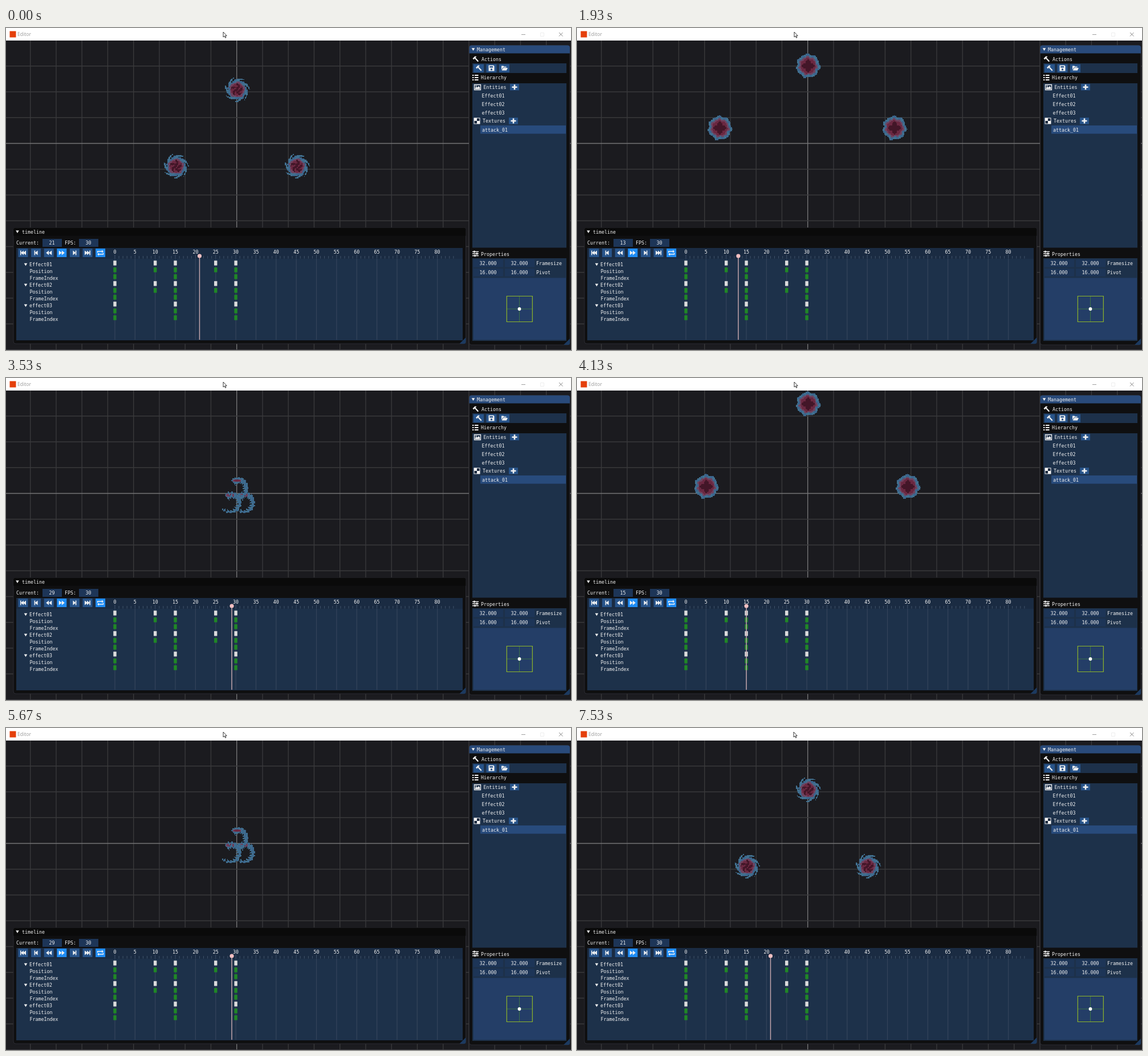
Write an HTML page with a canvas that moves like this. It is 991 by 565 pixels and loops after 7.59 s.

```html
<!DOCTYPE html>
<html lang="en">
<head>
<meta charset="utf-8">
<title>Editor</title>
<style>
  html, body { margin: 0; width: 991px; height: 565px; overflow: hidden; background: #1b1b1f; }
  svg, canvas { position: absolute; left: 0; top: 0; display: block; }
  text { font: 8.3px "DejaVu Sans Mono", monospace; fill: #f2f2f2; white-space: pre; }
  .mid { text-anchor: middle; }
  .caption { font: 8.6px "Open Sans", sans-serif; fill: #999; }
</style>
</head>
<body>
<svg id="ui" width="991" height="565" viewBox="0 0 991 565"></svg>
<canvas id="view" width="812" height="350"></canvas>
<script>
const LOOP = 7590, STEP = 200 / 3;
const CELL = 45.25, ORIGIN = { x: 404.7, y: 202.5 };
const RULER = 191, UNIT = 7.07;
const NAVY = '#1d314a', FIELD = '#1d3557', BUTTON = '#28548a', ACTIVE = '#1f8cf4', WHITE = '#f2f2f2';

// ---- static interface -------------------------------------------------
const out = [];
const add = s => out.push(s);
const rect = (x, y, w, h, fill, more = '') =>
  add(`<rect x="${x}" y="${y}" width="${w}" height="${h}" fill="${fill}" ${more}/>`);
const path = (d, fill, more = '') => add(`<path d="${d}" fill="${fill}" ${more}/>`);
const stroke = (d, color, width = 1) => path(d, 'none', `stroke="${color}" stroke-width="${width}"`);
const text = (x, mid, s, cls = '', id = '') =>
  add(`<text x="${x}" y="${mid + 3}" class="${cls}" id="${id}">${s}</text>`);
const icon = (x, y, d, fill = WHITE, more = '') => path(d, fill, `transform="translate(${x} ${y})" ${more}`);
const lineIcon = (x, y, d, width = 1.3) =>
  icon(x, y, d, 'none', `stroke="${WHITE}" stroke-width="${width}"`);
const arrow = (x, y) => icon(x, y, 'M-2.8-2.2H2.8L0 2.6Z');
const field = (x, y, w, h, value, id) => {
  rect(x, y, w, h, FIELD);
  text(x + w / 2 - 0.5, y + h / 2, value, 'mid', id);
};

function grid() {
  for (let i = -8; i <= 12; i++) {
    const x = ORIGIN.x + i * CELL;
    stroke(`M${x} 22V565`, i ? '#39393b' : '#747476', 1.4);
  }
  for (let i = -3; i <= 7; i++) {
    const y = ORIGIN.y + i * CELL;
    stroke(`M0 ${y}H991`, i ? '#39393b' : '#747476', 1.4);
  }
  stroke('M0 564.5H991', '#3a3a40');
}

function titleBar() {
  rect(0, 0, 991, 22, '#fff');
  rect(6.5, 5.5, 11, 11, '#e5400c');
  text(20, 11.3, 'Editor', 'caption');
  stroke('M904 11.5h7', '#a0a0a0');
  stroke('M937.5 8.5h6v6h-6z', '#ededed');
  stroke('M970 8l6.5 6.5M976.5 8l-6.5 6.5', '#888');
}

function panel(x, y, w, h, head) {
  rect(x, y, w, h, '#0f0f10', 'rx="4" stroke="#2b2b32"');
  path(`M${x} ${y + 14}v-10q0-4 4-4h${w - 8}q4 0 4 4v10z`, head);
  path(`M${x + w} ${y + h - 11}v8q0 3-3 3h-8z`, '#1c3a60');
  arrow(x + 7, y + 7);
}

function timeline() {
  panel(13, 350.5, 793.5, 203.5, '#0a0a0a');
  text(28, 357.5, 'timeline');
  text(18, 377, 'Current:');
  field(64, 370, 34, 14, '21', 'current');
  text(103, 377, 'FPS:');
  field(128, 370, 34, 14, '30');
  rect(18, 386, 783, 162, NAVY);
  rect(18, 386, 783, 19, '#1a2b42');

  const left = 'M0-4V4L-5 0Z', right = 'M0-4V4L5 0Z';
  const shift = (d, x) => d.replace('M0', 'M' + x).replace(/L(-?\d)/, (_, n) => 'L' + (+n + x));
  const glyphs = [
    'M-5-4h1.6v8h-1.6z' + shift(left, 1) + shift(left, 5),
    'M-3-4h1.6v8h-1.6z' + shift(left, 3),
    shift(left, 0) + shift(left, 5),
    shift(right, -5) + shift(right, 0),
    shift(right, -3) + 'M1.4-4h1.6v8h-1.6z',
    shift(right, -5) + shift(right, -1) + 'M3.4-4h1.6v8h-1.6z'
  ];
  for (let i = 0; i < 7; i++) {
    const x = 30 + i * 22.6;
    rect(x - 8.5, 387, 17, 15, i === 3 || i === 6 ? ACTIVE : BUTTON);
    if (i < 6) icon(x, 394.5, glyphs[i]);
    else {
      lineIcon(x, 394.5, 'M-5 0V-2.5H3M5 0V2.5H-3');
      icon(x, 394.5, 'M2.5-5L5.5-2.5 2.5 0ZM-2.5 0L-5.5 2.5-2.5 5Z');
    }
  }

  for (let f = 0; f <= 84; f++) {
    const x = RULER + f * UNIT, major = f % 5 === 0;
    stroke(`M${x} ${major ? 398 : 400}V404.5`, '#41536a');
    if (!major) continue;
    stroke(`M${x} 405V547`, '#33435a', 1.3);
    text(x, 393, f, 'mid');
  }

  const long = [0, 10, 15, 25, 30], short = [0, 15, 30];
  const keys = (frames, y, fill) =>
    frames.forEach(f => rect(RULER + f * UNIT - 2.7, y - 4.2, 5.4, 8.4, fill));
  ['Effect01', 'Effect02', 'effect03'].forEach((name, i) => {
    const y = 415 + i * 36, frames = i < 2 ? long : short;
    arrow(34.5, y);
    text(41, y, name);
    text(41.5, y + 12, 'Position');
    text(41.5, y + 24, 'FrameIndex');
    keys(frames, y - 2.6, '#dcdcdc');
    keys(frames, y + 9.4, '#208726');
    keys(short, y + 21.4, '#208726');
  });
  add('<g id="head"><path d="M0 400V547" stroke="#c3a5ac" stroke-width="1.5"/><circle cy="400" r="3.6" fill="#f4c0c2"/></g>');
}

function plus(x, y) {
  rect(x - 8, y - 5.7, 16, 11.4, BUTTON);
  lineIcon(x, y, 'M-4.5 0H4.5M0-4.5V4.5', 2.6);
}

function hammer(x, y) {
  icon(x, y, 'M-5-1L-1-5 2-4.5 0-2.5 5.5 3.5 4 5-1.5-1-3 1Z');
}

function management() {
  panel(812.5, 30.5, 176.5, 525.5, '#294a7a');
  text(826, 37.5, 'Management');
  hammer(823.5, 54.5);
  text(834, 54.5, 'Actions');
  rect(818, 62, 165, 17, NAVY);
  [829, 851.5, 874].forEach(x => rect(x - 9, 63.5, 18, 14.5, BUTTON));
  hammer(829, 70.5);
  icon(851.5, 70.5, 'M-5-5H3.5L5-3.5V5H-5ZM-3.2-3.6V-1H2.6V-3.6ZM-1.7 2.3a1.7 1.7 0 1 0 3.4 0a1.7 1.7 0 1 0-3.4 0Z', WHITE, 'fill-rule="evenodd"');
  icon(874, 70.5, 'M-5 3V-4H-1.5L-.5-2.8H3.5V-1.2H-2.5ZM-4.5 4L-2-.4H6L3.8 4Z');

  lineIcon(823, 87, 'M-5-4H-2.6M-5 0H-2.6M-5 4H-2.6M-1-4H5.5M-1 0H5.5M-1 4H5.5', 2);
  text(833, 87, 'Hierarchy');
  rect(818, 97, 165, 288.5, NAVY);
  lineIcon(827, 104, 'M-5.5-4.5H5.5V4.5H-5.5Z');
  icon(827, 104, 'M-4.3 3.2V1L-2-1-.5.5 2-2 4.3.6V3.2ZM-3.5-2.2a1 1 0 1 0 2 0a1 1 0 1 0-2 0Z');
  text(837.5, 104, 'Entities');
  plus(892, 103.7);
  ['Effect01', 'Effect02', 'effect03'].forEach((s, i) => text(834.5, 119 + i * 14.8, s));
  rect(820.5, 157.5, 11, 11, WHITE);
  path('M826 158.5h4.5v4.5h-4.5zM821.5 163h4.5v4.5h-4.5z', '#16253a');
  text(836, 163, 'Textures');
  plus(890, 163);
  rect(832, 171, 150, 14.5, '#284b7c');
  text(835, 178.5, 'attack_01');

  lineIcon(823.5, 396, 'M-5.5-3.5H5.5M-5.5 0H5.5M-5.5 3.5H5.5');
  lineIcon(823.5, 396, 'M-2-5.2V-1.8M2.5-1.7V1.7M-1 1.8V5.2', 2);
  text(833, 396.5, 'Properties');
  rect(818, 404, 165, 145, NAVY);
  [['32.000', 'Framesize'], ['16.000', 'Pivot']].forEach(([value, label], i) => {
    const y = 406 + i * 16.3;
    field(820, y, 52, 13.6, value);
    field(875, y, 52, 13.6, value);
    text(930, y + 6.8, label);
  });
  rect(820, 438.5, 162, 108.5, '#243e67');
  stroke('M900.5 470.5V515.5M878 493H923', '#3c7148');
  stroke('M878.3 470.5h45v45h-45z', '#8fb629', 1.2);
  add('<circle cx="900.5" cy="493" r="2.9" fill="#fff"/>');
}

grid();
titleBar();
timeline();
management();
add('<path id="mouse" d="M0 0V9L2.1 7.1 3.6 10.3 5 9.7 3.6 6.6H6.2Z" fill="#fff" stroke="#222" stroke-width=".9"/>');
document.getElementById('ui').innerHTML = out.join('');

// ---- pixel sprites ----------------------------------------------------
const SIZE = 32, SCALE = CELL / SIZE, TAU = Math.PI * 2;
const BLUE = '#41708f', STEEL = '#3b658c', MAUVE = '#6d4460', WINE = '#6b2841', DARK = '#431628';
const frac = v => v - Math.floor(v);

function crescent(stage, x, y, r, a) {
  const u = (a + 2.25) / (4.7 + stage * 0.5);
  if (u < 0 || u > 1) return;
  const jag = 0.7 * Math.sin(a * 17 + r);
  const outer = 11.4 + 2.4 * Math.sin(Math.min(1, u * 2) * Math.PI / 2) + jag;
  const inner = outer - (7.2 + stage * 2) * (1 - u) - 1.6 + jag;
  if (r > outer || r < inner) return;
  const spot = Math.hypot(x / (5.5 + stage), (y + 8.5) / (1.8 + stage));
  if (spot < 1) return spot < 0.65 ? WINE : MAUVE;
  return Math.sin(a * 9 + r * 2) > 0.2 ? STEEL : BLUE;
}

function swirl(stage, x, y, r, a) {
  const core = stage === 2 ? 7.5 : 9.6;
  const wobble = Math.sin(a * 5 + r * 0.9);
  if (r < core + wobble * 0.7) {
    if (r > core - 2) return MAUVE;
    if (r > core - 4.5) return wobble > -0.2 ? WINE : DARK;
    return Math.sin(x * 1.3 + y) + wobble > 0.5 ? WINE : DARK;
  }
  const arm = frac(a / TAU * 7 - r * 0.13);
  if (r < 11 + 5 * arm && (r < 12 || arm > 0.35)) return arm > 0.6 ? BLUE : STEEL;
}

function blob(x, y, r, a) {
  const lump = Math.sin(a * 7 + 1) * 0.7 + Math.sin(a * 11) * 0.5;
  if (r > 14.6 + lump) return;
  if (r > 11.2 + lump) return Math.sin(a * 13) > 0 ? BLUE : STEEL;
  if (r > 9.4 + lump * 0.6) return MAUVE;
  if (r > 6.4 + 1.6 * Math.cos(a * 4)) return WINE;
  return DARK;
}

function sprite(stage) {
  const tile = document.createElement('canvas');
  tile.width = tile.height = SIZE;
  const pen = tile.getContext('2d');
  for (let j = 0; j < SIZE; j++) for (let i = 0; i < SIZE; i++) {
    const x = i - 15.5, y = j - 15.5, r = Math.hypot(x, y), a = Math.atan2(y, x);
    const color = stage < 2 ? crescent(stage, x, y, r, a)
      : stage < 4 ? swirl(stage, x, y, r, a) : blob(x, y, r, a);
    if (!color) continue;
    pen.fillStyle = color;
    pen.fillRect(i, j, 1, 1);
  }
  return tile;
}
const sprites = [0, 1, 2, 3, 4].map(sprite);

// ---- playback ---------------------------------------------------------
const sideKeys = [[0, 0], [10, -50], [15, -12], [25, 75], [30, 0]];
const apexKeys = [[0, 0], [15, -157], [30, 0]];

function tween(keys, f) {
  const i = Math.max(1, keys.findIndex(k => k[0] >= f));
  const [f0, v0] = keys[i - 1], [f1, v1] = keys[i];
  return v0 + (v1 - v0) * (f - f0) / (f1 - f0);
}

const view = document.getElementById('view').getContext('2d');
const head = document.getElementById('head');
const mouse = document.getElementById('mouse');
const current = document.getElementById('current');

function stepAt(t) {
  const s = Math.floor((t + 5) / STEP);
  return Math.round(s * STEP / 10) * 10 > t ? s - 1 : s;
}

// The playhead advances two frames per step and rests once on the last one.
function frameAt(s) {
  if (s < 2) return 21 + s;
  return Math.min(30, (19 + 2 * s) % 32);
}

function draw(s) {
  const f = frameAt(s), rise = Math.min(f, 30 - f) / 15;
  const tile = sprites[Math.min(4, Math.floor(rise * 5 + 1e-6))];
  const put = (x, y) => view.drawImage(tile,
    ORIGIN.x + 0.6 + x - SIZE * SCALE / 2, ORIGIN.y + y - SIZE * SCALE / 2, SIZE * SCALE, SIZE * SCALE);
  view.clearRect(0, 0, 812, 350);
  view.imageSmoothingEnabled = false;
  const side = tween(sideKeys, f);
  put(-178.5 * rise, side);
  put(175 * rise, side);
  put(0, tween(apexKeys, f));

  current.textContent = f;
  head.setAttribute('transform', `translate(${RULER + f * UNIT} 0)`);
  mouse.setAttribute('transform', `translate(${s >= 112 ? 380 : 381} 7)`);
}

const start = performance.now();
let shown = -1;
function tick() {
  const s = stepAt((performance.now() - start) % LOOP);
  if (s !== shown) draw(shown = s);
  requestAnimationFrame(tick);
}
tick();
</script>
</body>
</html>
```
